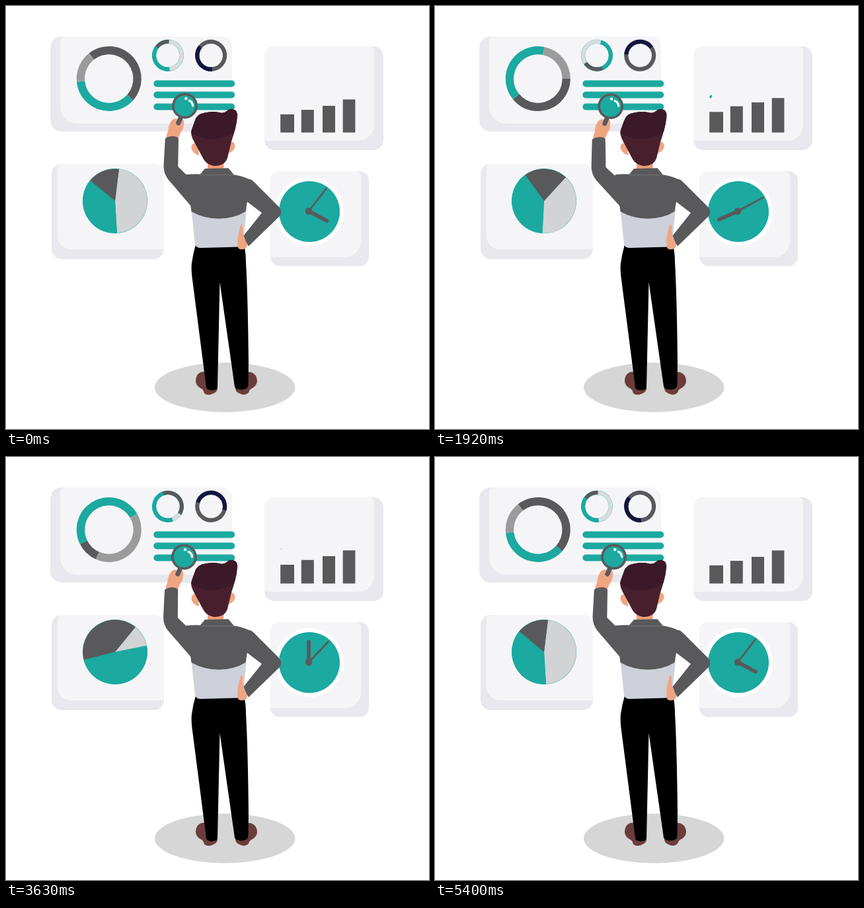
These frames come from a looping animation (640x640 px, 5.43 s). An HTML page with a canvas:

```html
<!DOCTYPE html>
<html lang="en">
<head>
<meta charset="utf-8">
<title>Analyst at the dashboard</title>
<style>
html, body { margin: 0; width: 100%; height: 100%; overflow: hidden; background: #fff; }
canvas { display: block; width: 640px; height: 640px; }
</style>
</head>
<body>
<canvas id="stage" width="640" height="640"></canvas>
<script>
const ctx = document.getElementById('stage').getContext('2d');
const TAU = Math.PI * 2, RAD = Math.PI / 180;
const LOOP = 5430, SPAN = 5400, STEP = 30, BEAT = 1800;
const DARK = '#59595b', TEAL = '#1ba9a0', GREY = '#9b9b9b', LIGHT = '#d2d3d5',
  PALE = '#d9dcde', NAVY = '#12153f', SKIN = '#f0a581', BROWN = '#6b3d3a',
  EDGE = '#e8e8ee', PANEL = '#f5f5f8';

const beat = (t, peak) => Math.cos(TAU * (t - peak) / BEAT);
const clamp = v => Math.max(0, Math.min(1, v));
const ease = v => (1 - Math.cos(Math.PI * clamp(v))) / 2;

// Periodic smooth curve through unevenly spaced keys
const KEYS = [0, 1290, 1920, 2580, 3630, 4410];
function curve(vals, t) {
  const n = KEYS.length;
  const time = i => KEYS[(i + n) % n] + SPAN * Math.floor(i / n);
  const val = i => vals[(i + n) % n];
  const slope = i => (val(i + 1) - val(i - 1)) / (time(i + 1) - time(i - 1));
  t %= SPAN;
  let i = n - 1;
  while (KEYS[i] > t) i--;
  const h = time(i + 1) - time(i), u = (t - time(i)) / h, v = 1 - u;
  return v * v * (1 + 2 * u) * val(i) + u * v * v * h * slope(i)
    + u * u * (3 - 2 * u) * val(i + 1) - u * u * v * h * slope(i + 1);
}

function shape(d, color) {
  ctx.fillStyle = color;
  ctx.fill(new Path2D(d));
}
function disc(x, y, r, color) {
  ctx.fillStyle = color;
  ctx.beginPath();
  ctx.arc(x, y, r, 0, TAU);
  ctx.fill();
}
function box(x, y, r, b, radii, color) {
  ctx.fillStyle = color;
  ctx.beginPath();
  ctx.roundRect(x, y, r - x, b - y, radii);
  ctx.fill();
}
function line(d, width, color) {
  ctx.strokeStyle = color;
  ctx.lineWidth = width;
  ctx.stroke(new Path2D(d));
}
function turned(x, y, angle, draw) {
  ctx.save();
  ctx.translate(x, y);
  ctx.rotate(angle);
  ctx.translate(-x, -y);
  draw();
  ctx.restore();
}

// Angles run clockwise from twelve o'clock
function ring(x, y, outer, inner, start, sizes, colors) {
  let a = start;
  sizes.forEach((size, i) => {
    const from = (a - 90) * RAD, to = (a + size - 90) * RAD;
    ctx.fillStyle = colors[i];
    ctx.beginPath();
    ctx.arc(x, y, outer, from, to);
    if (inner) ctx.arc(x, y, inner, to, from, true);
    else ctx.lineTo(x, y);
    ctx.fill();
    a += size;
  });
}

function cards() {
  box(67, 46, 342, 190, 17, EDGE);
  box(82, 46, 342, 178, [7, 16, 0, 26], PANEL);
  box(391, 61, 571, 218, 15, EDGE);
  box(391, 61, 557, 204, [15, 7, 24, 3], PANEL);
  box(69, 239, 239, 383, 15, EDGE);
  box(78, 239, 239, 368, [7, 15, 3, 20], PANEL);
  box(400, 250, 549, 393.5, 14, EDGE);
  box(400, 250, 537, 380, [14, 7, 24, 3], PANEL);
}

function charts(t) {
  const spin = 360 * t / SPAN;
  const first = curve([169.5, 187, 140.5, 75.5, 39.5, 105.5], t);
  const last = curve([102.5, 85, 119.6, 168.4, 188, 135.7], t) - 45 * beat(t, 0);
  const sizes = [first, 360 - first - last, last];
  ring(155.8, 110, 49, 36.7, 322 + spin, sizes, [DARK, TEAL, GREY]);
  disc(165, 295, 49, TEAL);
  ring(165, 295, 48.7, 0, 29 - 22 * Math.cos(spin * RAD), sizes, [LIGHT, TEAL, DARK]);
  ring(245, 74.8, 24, 17.8, 4 - spin, [360], [TEAL]);
  ring(245, 74.8, 23.8, 18, 4 - spin, sizes, [PALE, TEAL, DARK]);
  ring(310.2, 74.8, 24, 17.8, 6 + spin, [360], [DARK]);
  ring(310.2, 74.8, 24, 17.8, 6 + spin + first, [sizes[1]], [NAVY]);
  [112.5, 129.5, 147.5].forEach(y => box(223.3, y, 346.3, y + 10, 5, TEAL));
}

function growth(t) {
  [36.6, 54.9, 75.6, 100].forEach((max, i) => {
    const h = max * (0.75 + 0.25 * beat(t, 450 + 150 * i));
    const x = [415.2, 446.8, 479, 509.7][i];
    ctx.fillStyle = DARK;
    ctx.fillRect(x, 191.4 - h, [20.8, 19, 19, 18.7][i], h);
  });
  const p = t % BEAT, len = 107;
  const head = len * ease(p / 900), tail = len * ease((p - 900) / 900);
  if (head - tail > 0.05) {
    ctx.save();
    ctx.setLineDash([head - tail, 999]);
    ctx.lineDashOffset = -tail;
    line('M416 139L441.3 102.3L463.3 109.8L498 60', 3, TEAL);
    ctx.restore();
  }
  const size = ease((p - 810) / 150) * (1 - ease((p - 1650) / 150));
  if (size > 0) {
    ctx.save();
    ctx.translate(484, 80);
    ctx.scale(size, size);
    shape('M14 -20.5L-12 -8.3L11.7 8.5Z', TEAL);
    ctx.restore();
  }
}

function hand(angle, length, width) {
  turned(458, 310.5, angle * RAD, () => line(`M458 310.5V${310.5 - length}`, width, DARK));
}
function clock(t) {
  disc(459, 311, 52, '#fff');
  disc(459, 311, 46, TEAL);
  ctx.lineCap = 'round';
  hand(37.6 + 360 * t / BEAT, 43.5, 2.8);
  hand(118 + 360 * t / SPAN, 31, 5.6);
  ctx.lineCap = 'butt';
  disc(458, 310.5, 5.2, DARK);
}

function raisedArm() {
  shape('M243 201Q242 196 245 190Q246 179 251 173Q256 168 261 172L266 171Q270 172 269 178Q269 186 264 192L260 202Z', SKIN);
  ctx.lineCap = 'round';
  line('M264.6 168.5L260.8 177', 7, DARK);
  ctx.lineCap = 'butt';
  disc(270.6, 151, 19.4, DARK);
  disc(270.6, 151, 15.8, TEAL);
  disc(272.3, 140, 2.2, '#fff');
  ctx.lineCap = 'round';
  line('M277.3 143.2Q282.5 145.5 282.6 151', 3.2, '#fff');
  ctx.lineCap = 'butt';
  shape('M240.8 202Q240.5 200 243 199Q251 195.5 258 198Q261 199 261 202L260.3 243L273 255.5L300 262L300 318L281 304L245 262Q238.5 253 238.5 242Z', DARK);
}

function head() {
  shape('M305 234H330.5L328 252H305Z', '#ee9c78');
  shape('M284 208Q279 210 281 217Q284 224 292 226L290 206Z', SKIN);
  shape('M341 205Q347 206 346.5 213Q345 220 336 223Z', SKIN);
  const hair = 'M286 173Q289 163 301 161.5Q314 159 322 161Q330 163 334 159Q338 155 343 156Q352 158 350 169Q348 185 341 205L335 230Q331 242 315 242Q304 240 299 232L285 206Q278 194 281 187Z';
  shape(hair, '#48202d');
  ctx.save();
  ctx.clip(new Path2D(hair));
  shape('M275 188Q291 202 314 201.5Q335 200 349 188V150H275Z', '#3c1928');
  ctx.restore();
}

function legs() {
  ctx.fillStyle = '#d6d6d6';
  ctx.beginPath();
  ctx.ellipse(331.2, 577, 106.3, 37.4, 0, 0, TAU);
  ctx.fill();
  shape('M303 553.5Q288 552 287 567Q287 574 294 578Q299 580 300 586Q305 590 312 587Q321 584 320 577Z', BROWN);
  shape('M364 553.5Q379 553 380 567Q380 574 373 578Q368 580 367 585Q362 590 355 587Q346 584 347 577Z', BROWN);
  shape('M287 361Q283 375 281 389Q280 397 281.5 410L303 577Q304 581 311 581.5Q319 581 320 577L323.5 418L346 576Q347 580 356 580.5Q366 580 366.5 574L367 540Q366 440 363 388Q363 373 360 361Z', '#000');
}

function torso() {
  shape('M280.5 308L286 360Q287 366 295 366L353 364.5Q358 364 359 358L364 306Z', '#ced1da');
  shape('M273 255Q288 253.5 300 255H343Q358 257 370 263L366 290L362.5 311Q345 321.5 322 321.8Q299 321.5 280.5 311L277 285Z', DARK);
  shape('M301 246L336.5 245.2L345 255.6H293Z', DARK);
  line('M293 255.7H345', 0.7, '#858588');
  shape('M355 331Q358 329 358 336L359 348L365 361Q365 367 359 368Q352 369 351 365Q349 356 352 343Z', SKIN);
  shape('M368 262Q371 262 375 266L413 304Q419 311 414 318L367 363.5Q363 358 359.5 347.5L387 313L362 294Z', DARK);
}

function draw(t) {
  ctx.fillStyle = '#fff';
  ctx.fillRect(0, 0, 640, 640);
  cards();
  charts(t);
  growth(t);
  clock(t);
  legs();
  turned(288, 302, 0.0815 * (beat(t, 1500) - 0.5), raisedArm);
  turned(318, 270, 2.5 * RAD * (1 - beat(t, 0)), head);
  torso();
}

const began = performance.now();
function tick() {
  const t = (performance.now() - began) % LOOP;
  draw(Math.floor(t / STEP) * STEP);
  requestAnimationFrame(tick);
}
tick();
</script>
</body>
</html>
```
